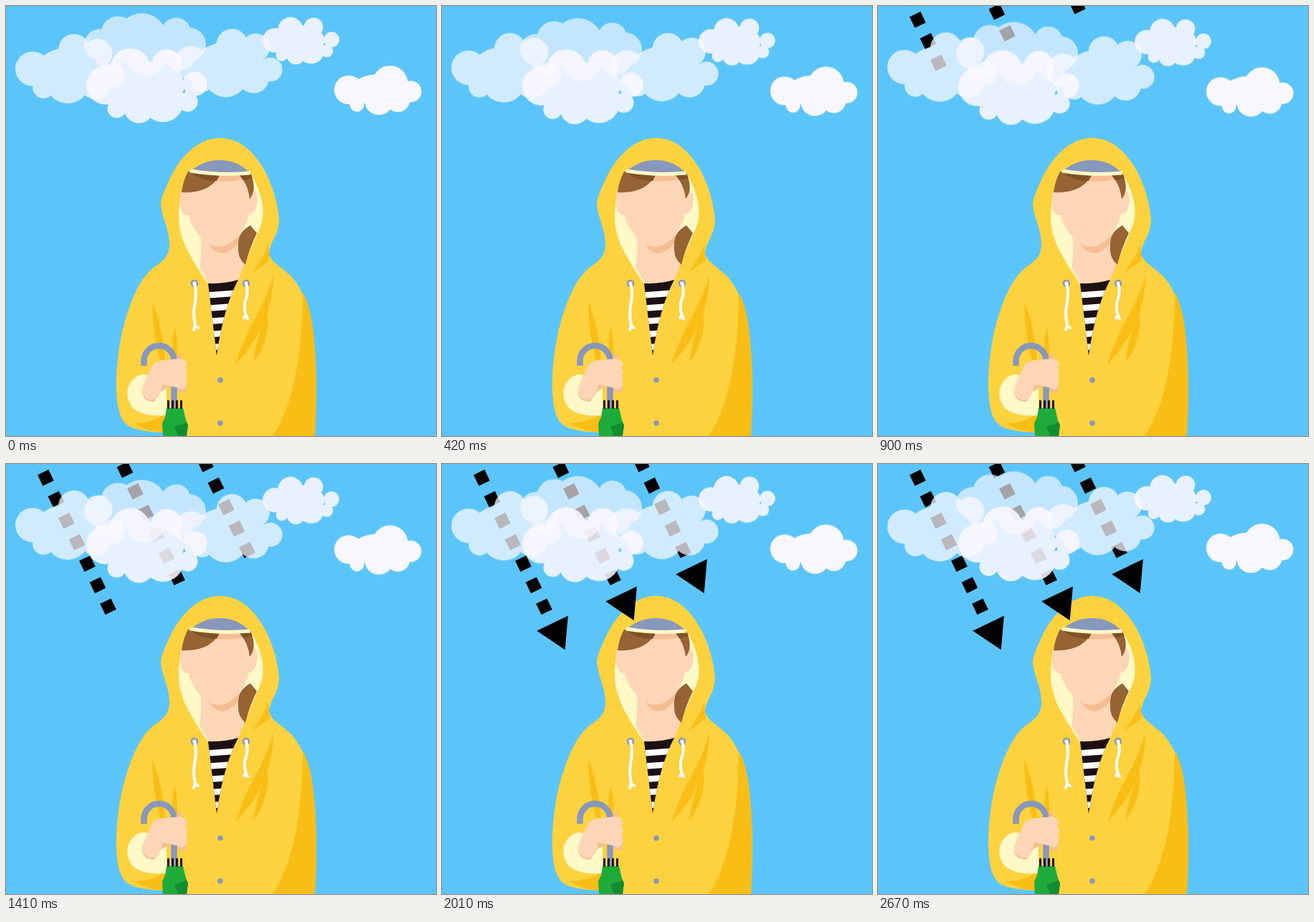
An HTML page that plays this animation: 600 px wide and 600 px high, repeating every 2.7 s.

```html
<!DOCTYPE html>
<html lang="en">
<head>
<meta charset="utf-8">
<title>Raincoat</title>
<style>
  html, body { margin: 0; width: 100%; height: 100%; overflow: hidden; background: #5bc5fa; }
  svg { display: block; width: 100vw; height: 100vh; }
  .cloud { fill: #fbf8ff; animation: bob 2.7s infinite; }
  #wipe rect { animation: wipe 2.7s infinite; }
  .skin { fill: #fcd6b6; }
  .blush { fill: #f6bd92; }
  .cream { fill: #fff9c8; }
  .hair { fill: #966335; }
  .shade { fill: #7f5125; }
  .fold { fill: #f9be15; }
  .steel { fill: #8898bc; }
  .cord { fill: none; stroke: #fff; stroke-width: 4; stroke-linecap: round; }
  @keyframes bob {
    0% { transform: none; animation-timing-function: cubic-bezier(.39, .575, .565, 1); }
    45% { transform: translateY(var(--drift)); animation-timing-function: cubic-bezier(.4, .2, .7, .75); }
    100% { transform: none; }
  }
  /* one dash per step, then the head */
  @keyframes wipe {
    0%, 12.3% { transform: none; animation-timing-function: steps(8, end); }
    49.9% { transform: translateX(266px); animation-timing-function: step-end; }
    54.6%, 100% { transform: translateX(330px); }
  }
</style>
</head>
<body>
<svg viewBox="0 0 600 600">
  <defs>
    <clipPath id="wipe"><rect x="-650" y="-40" width="400" height="80"/></clipPath>
    <clipPath id="neckline"><path d="M282 387Q306 388 324 382Q303 422 294 488Z"/></clipPath>
    <g id="arrow" clip-path="url(#wipe)">
      <path d="M-241.600 0H9" stroke="#000" stroke-width="17" stroke-dasharray="17 16.300"/>
      <path d="M26 24V-24.500L67 0Z"/>
    </g>
    <g id="eyelet"><circle r="4" fill="#e6dfc0" stroke="#8898bc" stroke-width="2.500"/></g>
  </defs>

  <!-- coat -->
  <path fill="#fcd23f" d="M298 184C268 184 242 212 229 240C221 258 216 268 216 277C217 294 228 311 228 333C228 347 221 355 207 364C185 381 172 416 162 455C155 488 152 522 155 550C158 578 167 587 184 591Q202 595 220 595V600H431C433 562 434 520 431 480C427 432 418 400 398 377C384 364 370 357 367 346C367 331 381 320 381 298C379 272 370 244 357 223C341 198 322 184 298 184Z"/>
  <g class="fold">
    <path d="M414 400Q428 424 431 480Q435 535 431 600H372Q413 540 414 400Z"/>
    <path d="M366 333Q358 353 344 372L368 355Z"/>
    <path d="M373 375Q366 404 341 448Q328 474 320 500Q373 445 373 375Z"/>
    <path d="M365 428Q350 460 345 498Q369 464 365 428Z"/>
    <path d="M204 412Q205 460 215 494H222Q218 445 204 412Z"/>
    <path d="M236 448Q230 470 233 494H240Q239 465 236 448Z"/>
    <path d="M178 582Q205 582 222 569V595Q196 594 178 582Z"/>
  </g>

  <!-- head -->
  <path class="cream" d="M257 229C244 251 241 276 241 298C242 330 264 361 282 388L324 382C332 358 343 337 351 317C364 293 360 265 341 233Z"/>
  <path class="hair" d="M341 306Q324 316 324 330V350Q328 358 334 361Q339 340 350 317Z"/>
  <path class="skin" d="M271 315Q274 340 270 364L283 387Q304 388 324 382L333 360Q324 352 324 340V315Z"/>
  <path class="blush" d="M281 329Q300 340 326 317L324 331Q300 360 281 329Z"/>
  <path class="skin" d="M255 232Q248 249 243 264Q241 293 255 292C259 311 272 325 285 333Q299 340 313 331Q332 318 339 291Q349 288 350 276Q353 264 346 256L341 234Z"/>
  <path class="blush" d="M294 236H330V242Q312 246 292 244Z"/>
  <path class="hair" d="M254 231Q247 244 245 260Q284 262 298 236ZM326 236Q338 250 340 269Q351 256 341 233Z"/>
  <path class="shade" d="M257 231L298 236L294 244Q270 244 257 231ZM326 236L341 233L344 240L331 243Z"/>
  <path class="steel" d="M258 230Q276 215 298 215Q324 215 341 234Q299 239 258 230Z"/>
  <path fill="none" stroke="#fff9c8" stroke-width="5" d="M257 230Q298 237 341 233"/>

  <!-- shirt and cords -->
  <g clip-path="url(#neckline)">
    <path fill="#1c1014" d="M270 370H340V490H270Z"/>
    <path transform="rotate(-4 300 400)" stroke="#fff" stroke-width="70" stroke-dasharray="8.500 9.700" d="M300 398V500"/>
  </g>
  <use href="#eyelet" x="263" y="387"/>
  <use href="#eyelet" x="335" y="387"/>
  <path class="cord" d="M263 387Q267 401 263 418Q261 432 264 446L262 452M264 446L268 449M335 387Q339 399 334 411Q331 421 335 432L332 435M335 432L337 436"/>
  <g class="steel"><circle cx="299" cy="522" r="3.800"/><circle cx="299" cy="582" r="3.800"/></g>

  <!-- hand and umbrella -->
  <path class="cream" d="M190 514Q176 517 170 533Q167 550 178 562Q193 574 224 571V532Q205 514 190 514Z"/>
  <path class="blush" d="M236 495L240 486L246 485L244 494ZM190 537Q190 552 207 552L216 538L230 530Q242 542 252 538V520H215Z"/>
  <path fill="none" stroke="#8898bc" stroke-width="8.500" d="M192.500 502V495A21 21 0 0 1 234.500 495V562"/>
  <path class="skin" d="M205 500Q211 494 224 494L242 492Q251 493 253 500L250 505Q255 511 251 517Q254 523 251 531Q247 538 241 533L218 528Q216 550 201 550Q188 545 190 534Q196 516 205 500Z"/>
  <path fill="#1fab3a" d="M224 561H247L251 578L254 585L252 600H219L218 582L222 574Z"/>
  <path fill="#128c30" d="M235 587L252 581L254 585L252 600H240Z"/>
  <path stroke="#1c1014" stroke-width="20.500" stroke-dasharray="3 3" d="M225 556H246" transform="translate(0 250.200) scale(1 .550)"/>

  <use href="#arrow" transform="translate(142.500 199) rotate(64.150)"/>
  <use href="#arrow" transform="translate(238.500 158) rotate(64.150)"/>
  <use href="#arrow" transform="translate(336.500 120) rotate(64.150)"/>
  <g id="sky"></g>
</svg>
<script>
  // A cloud is a core ellipse with puffs, each [angle, radius], touching the rim of a larger one.
  const broad = { w: 84.5, h: 53.5, puffs: [[180, 27], [-114, 28], [-64, 21], [-3, 17], [36, 14], [66, 29], [100, 21], [126, 13]] };
  const tall = { w: 78, h: 48.5, puffs: [[180, 24], [-86, 22], [-50, 20], [17, 17], [52, 22], [96, 31], [128, 15]] };
  const wide = { w: 85, h: 44, puffs: [[180, 22], [-128, 24], [-95, 35], [-48, 20], [0, 24], [40, 22], [90, 28], [140, 20]] };
  const small = { w: 61, h: 35, puffs: [[180, 20], [-62, 25], [7, 15], [51, 17], [88, 20], [125, 10]] };

  const sky = document.getElementById('sky');

  function addCloud({ w, h, puffs }, x, y, scale, alpha, drift) {
    const circles = puffs.map(([deg, r]) => {
      const a = deg * Math.PI / 180;
      return `<circle cx="${(w - r) * Math.cos(a)}" cy="${(h - r) * Math.sin(a)}" r="${r}"/>`;
    });
    sky.insertAdjacentHTML('beforeend',
      `<g class="cloud" style="--drift:${drift}px" opacity="${alpha}">
        <g transform="translate(${x} ${y}) scale(${scale})">
          <ellipse rx="${w * .62}" ry="${h * .62}"/>${circles.join('')}
        </g>
      </g>`);
  }

  addCloud(wide, 194, 54, 1, .66, 13);
  addCloud(tall, 91, 87.5, 1, .74, -2.5);
  addCloud(tall, 311.5, 79.5, .985, .74, 11);
  addCloud(broad, 196.5, 110.5, 1, .88, 2.5);
  addCloud(broad, 411.5, 48, .633, .88, 2.5);
  addCloud(small, 519, 117, 1, .98, 2.5);
</script>
</body>
</html>
```
